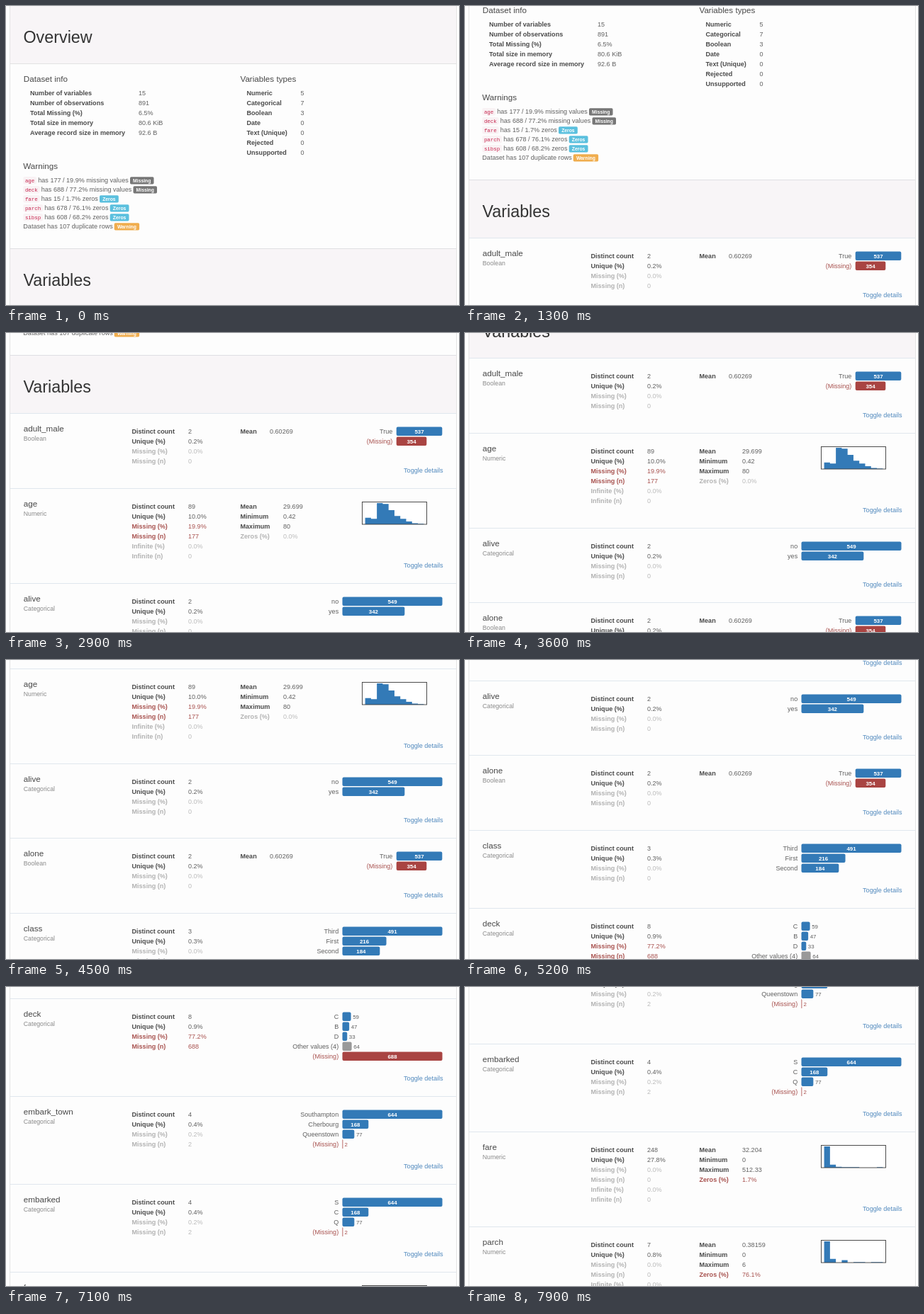
Recreate the animation shown at these times as an HTML page. Size 639x422 px, loop 8 s.

```html
<!DOCTYPE html>
<html lang="en">
<head>
<meta charset="utf-8">
<title>Data profile report</title>
<style>
html, body { margin: 0; width: 100%; height: 100%; overflow: hidden; background: #fff; }
svg { display: block; width: 639px; height: 422px; font: 9.07px "Liberation Sans", Arial, sans-serif; }
text { fill: #606060; white-space: pre; }
.h1 { font-size: 23.3px; fill: #333; }
.h3 { font-size: 11.65px; fill: #484848; }
.type { font-size: 8.74px; fill: #8a8a8a; }
.key { font-weight: bold; fill: #4a4a4a; }
.alert { fill: #a8524f; }
.ignore { opacity: .42; }
.link { fill: #4f88bd; }
.code { font: 7.48px "Liberation Mono", monospace; fill: #c7254e; }
.badge { font-size: 6.8px; font-weight: bold; fill: #fff; text-anchor: middle; }
.count { font-size: 7.9px; }
.in { fill: #fff; font-weight: bold; text-anchor: middle; }
.end { text-anchor: end; }
</style>
</head>
<body>
<svg viewBox="0 0 639 422">
  <rect x="5" width="631" height="422" fill="#fdfdfd"/>
  <g id="page"></g>
  <path d="M5.5 0V422M635.5 0V422" stroke="#e4e4e4"/>
</svg>
<script>
const NS = 'http://www.w3.org/2000/svg';
const page = document.getElementById('page');
const BLUE = '#337ab7', RED = '#a94442', GREY = '#999';

function add(parent, tag, attrs, content) {
  const node = document.createElementNS(NS, tag);
  for (const name in attrs) node.setAttribute(name, attrs[name]);
  if (content !== undefined) node.textContent = content;
  return parent.appendChild(node);
}
const text = (g, x, y, content, cls = '') => add(g, 'text', { x, y, class: cls }, content);
const rect = (g, x, y, width, height, fill, rx = 0) => add(g, 'rect', { x, y, width, height, fill, rx });
const rule = (g, y, stroke) => add(g, 'path', { d: `M6 ${y + .5}H635`, stroke });

function header(y, title) {
  rect(page, 6, y, 629, 82, '#f8f5f7');
  if (y) rule(page, y, '#dfdfe3');
  rule(page, y + (y ? 82 : 81), '#e2e2e2');
  text(page, 24.5, y + (y ? 53 : 52), title, 'h1');
}

function table(g, x, valueX, y, rows) {
  rows.forEach(([key, value, cls = ''], i) => {
    text(g, x, y + 14 * i, key, 'key ' + cls);
    text(g, valueX, y + 14 * i, value, cls);
  });
}

function warning(i, code, message, badgeX, badgeW, label, color) {
  const y = 249.2 + 13 * i;
  let x = 24.3;
  if (code) {
    const w = code.length * 4.49 + 5.2;
    rect(page, x, y - 8.2, w, 10.6, '#f9f2f4', 2);
    text(page, x + 2.6, y, code, 'code');
    x += w + 2.3;
  }
  text(page, x, y, message);
  rect(page, badgeX, y - 8, badgeW, 10.3, color, 1.7);
  text(page, badgeX + badgeW / 2, y - .5, label, 'badge');
}

function overview() {
  header(0, 'Overview');
  text(page, 24.8, 107, 'Dataset info', 'h3');
  table(page, 34, 187, 126.3, [
    ['Number of variables', '15'], ['Number of observations', '891'],
    ['Total Missing (%)', '6.5%'], ['Total size in memory', '80.6 KiB'],
    ['Average record size in memory', '92.6 B']]);
  text(page, 330.5, 107, 'Variables types', 'h3');
  table(page, 339.5, 415.5, 126.3, [
    ['Numeric', '5'], ['Categorical', '7'], ['Boolean', '3'], ['Date', '0'],
    ['Text (Unique)', '0'], ['Rejected', '0'], ['Unsupported', '0']]);
  text(page, 24.3, 230.3, 'Warnings', 'h3');
  warning(0, 'age', 'has 177 / 19.9% missing values', 175, 33.5, 'Missing', '#777');
  warning(1, 'deck', 'has 688 / 77.2% missing values', 179.5, 33.5, 'Missing', '#777');
  warning(2, 'fare', 'has 15 / 1.7% zeros', 132, 26.8, 'Zeros', '#5bc0de');
  warning(3, 'parch', 'has 678 / 76.1% zeros', 146.7, 26.8, 'Zeros', '#5bc0de');
  warning(4, 'sibsp', 'has 608 / 68.2% zeros', 146.7, 26.8, 'Zeros', '#5bc0de');
  warning(5, '', 'Dataset has 107 duplicate rows', 152.7, 35.4, 'Warning', '#f0ad4e');
  header(342, 'Variables');
}

function bars(g, x, width, rows) {
  const max = Math.max(...rows.map(r => r[1]));
  rows.forEach(([label, n], i) => {
    const y = 19.5 + 14 * i, w = n / max * width;
    const missing = label === '(Missing)';
    const color = missing ? RED : label.startsWith('Other') ? GREY : BLUE;
    const tone = missing ? ' alert' : '';
    text(g, x - 5.3, y + 9.4, label, 'end' + tone);
    rect(g, x, y, Math.max(w, .8), 12.6, color, Math.min(2, w / 2));
    if (w > 30) text(g, x + w / 2, y + 9.1, n, 'count in');
    else text(g, x + w + 2.6, y + 9.1, n, 'count' + tone);
  });
}

function histogram(g, counts) {
  const max = Math.max(...counts);
  rect(g, 502.5, 19.5, 91, 31.5, '#fff');
  const steps = counts.map(n => `V${51 - (n && Math.max(n / max * 30, .7))}h8.27`);
  add(g, 'path', { d: `M506.6 51${steps.join('')}V51Z`, fill: BLUE });
  add(g, 'rect', { x: 502.5, y: 19.5, width: 91, height: 31.5, fill: 'none', stroke: '#3a3a3a', 'stroke-width': .9 });
}

const KEYS = ['Distinct count', 'Unique (%)', 'Missing (%)', 'Missing (n)', 'Infinite (%)', 'Infinite (n)'];

function variable(top, bottom, { name, type, stats, extra = [], rows, counts }) {
  const g = add(page, 'g', { transform: `translate(0 ${top})` });
  rule(g, 0, '#e0e7ee');
  text(g, 24.8, 25.7, name, 'h3');
  text(g, 24.8, 38.6, type, 'type');
  const many = parseFloat(stats[2]) > 10;
  table(g, 177.5, 257, 28.9, stats.map((value, i) =>
    [KEYS[i], value, i < 2 ? '' : many && i < 4 ? 'alert' : 'ignore']));
  table(g, 330.5, counts ? 391 : 372, 28.9, extra);
  if (counts) histogram(g, counts);
  else if (type === 'Boolean') bars(g, 550.7, 64.6, rows);
  else bars(g, 474.5, 141, rows);
  text(g, 616.5, bottom - top - 22, 'Toggle details', 'link end');
}

const numeric = (mean, min, max, zeros, cls) =>
  [['Mean', mean], ['Minimum', min], ['Maximum', max], ['Zeros (%)', zeros, cls]];
const flag = name => ({
  name, type: 'Boolean', stats: ['2', '0.2%', '0.0%', '0'],
  extra: [['Mean', '0.60269']], rows: [['True', 537], ['(Missing)', 354]]
});
const port = (name, a, b, c) => ({
  name, type: 'Categorical', stats: ['4', '0.4%', '0.2%', '2'],
  rows: [[a, 644], [b, 168], [c, 77], ['(Missing)', 2]]
});

const variables = [
  flag('adult_male'),
  { name: 'age', type: 'Numeric', stats: ['89', '10.0%', '19.9%', '177', '0.0%', '0'],
    extra: numeric('29.699', '0.42', '80', '0.0%', 'ignore'),
    counts: [54, 46, 177, 169, 118, 70, 45, 24, 9, 2] },
  { name: 'alive', type: 'Categorical', stats: ['2', '0.2%', '0.0%', '0'],
    rows: [['no', 549], ['yes', 342]] },
  flag('alone'),
  { name: 'class', type: 'Categorical', stats: ['3', '0.3%', '0.0%', '0'],
    rows: [['Third', 491], ['First', 216], ['Second', 184]] },
  { name: 'deck', type: 'Categorical', stats: ['8', '0.9%', '77.2%', '688'],
    rows: [['C', 59], ['B', 47], ['D', 33], ['Other values (4)', 64], ['(Missing)', 688]] },
  port('embark_town', 'Southampton', 'Cherbourg', 'Queenstown'),
  port('embarked', 'S', 'C', 'Q'),
  { name: 'fare', type: 'Numeric', stats: ['248', '27.8%', '0.0%', '0', '0.0%', '0'],
    extra: numeric('32.204', '0', '512.33', '1.7%', 'alert'),
    counts: [732, 106, 31, 2, 11, 6, 0, 0, 0, 3] },
  { name: 'parch', type: 'Numeric', stats: ['7', '0.8%', '0.0%', '0', '0.0%', '0'],
    extra: numeric('0.38159', '0', '6', '76.1%', 'alert'),
    counts: [678, 118, 0, 80, 0, 5, 4, 0, 5, 1] }
];
const edges = [424, 530, 664, 769, 875, 985, 1123, 1247, 1371, 1505, 1639];

overview();
variables.forEach((v, i) => variable(edges[i], edges[i + 1], v));

// Bursts of wheel scrolling: start time, then the position in notches every 100 ms.
const LOOP = 8000, TICK = 100, NOTCH = 64.75;
const bursts = [
  [800, .06, .8, 1],
  [1300, 1.5, 2],
  [1700, 2.5, 3],
  [2400, 3.06, 3.8, 4],
  [2800, 4.06, 4.8, 5],
  [3400, 5.06, 5.8, 6],
  [3800, 6.5, 7],
  [4300, 7.06, 7.8, 8, 8.3, 8.8, 9],
  [5100, 9.06, 9.8, 10.2, 10.8, 11],
  [5800, 11.5, 12, 12.6, 13],
  [6800, 13.3, 13.9, 14.5, 14.97, 15.5, 16],
  [7700, 16.3, 17.4, 18.03]
];

function scrollAt(t) {
  let notches = 0;
  for (const [start, ...steps] of bursts) {
    if (t < start) break;
    notches = steps[Math.min(Math.floor((t - start) / TICK), steps.length - 1)];
  }
  return Math.round(notches * NOTCH);
}

const origin = performance.now();
function draw() {
  const t = Math.max(0, performance.now() - origin) % LOOP;
  page.setAttribute('transform', `translate(0 ${-scrollAt(t)})`);
  requestAnimationFrame(draw);
}
draw();
</script>
</body>
</html>
```
